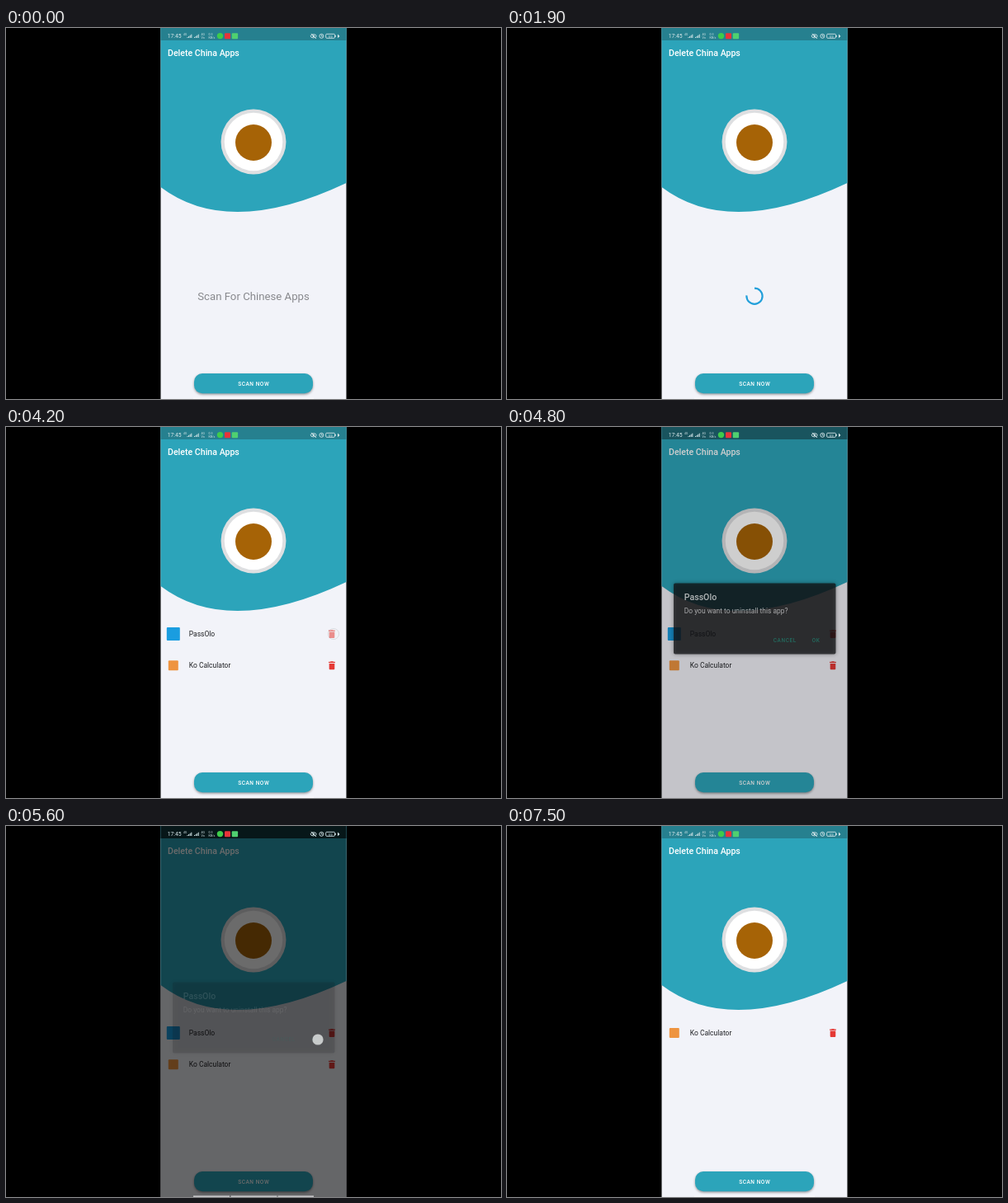
Animation, 600 px wide and 450 px high, one loop 8000 ms. Source, as an HTML page with a canvas:

```html
<!DOCTYPE html>
<html lang="en">
<head>
<meta charset="utf-8">
<title>App scan</title>
<style>
  html, body { margin: 0; width: 100%; height: 100%; overflow: hidden; background: #000; }
  canvas { display: block; width: 600px; height: 450px; }
</style>
</head>
<body>
<canvas id="stage" width="600" height="450"></canvas>
<script>
const ctx = document.getElementById('stage').getContext('2d');
const LOOP = 8000, STEP = 100;
const LEFT = 187.5, WIDTH = 225;
const TEAL = '#2ca4ba', PAGE = '#f2f3f9', RED = '#e53935';
const APPS = [
  { name: 'PassOlo', color: '#1a9de0', size: 16 },
  { name: 'Ko Calculator', color: '#ee9440', size: 12 }
];

const ramp = (t, a, b) => Math.min(1, Math.max(0, (t - a) / (b - a)));
const ease = u => u * u * (3 - 2 * u);

function rect(x, y, w, h, color) {
  ctx.fillStyle = color;
  ctx.fillRect(x, y, w, h);
}

function round(x, y, w, h, r, color) {
  ctx.fillStyle = color;
  ctx.beginPath();
  ctx.roundRect(x, y, w, h, r);
  ctx.fill();
}

function disc(x, y, r, color) {
  ctx.fillStyle = color;
  ctx.beginPath();
  ctx.arc(x, y, r, 0, 2 * Math.PI);
  ctx.fill();
}

function text(str, x, y, size, color, { weight = 400, align = 'left', spacing = 0 } = {}) {
  ctx.font = `${weight} ${size}px Roboto, sans-serif`;
  ctx.textAlign = align;
  ctx.letterSpacing = spacing + 'px';
  ctx.fillStyle = color;
  ctx.fillText(str, x, y);
}

function drawHeader() {
  ctx.fillStyle = TEAL;
  ctx.beginPath();
  ctx.moveTo(LEFT, 0);
  ctx.lineTo(LEFT, 193);
  ctx.quadraticCurveTo(270, 255.5, LEFT + WIDTH, 188);
  ctx.lineTo(LEFT + WIDTH, 0);
  ctx.fill();
  rect(LEFT, 0, WIDTH, 15, '#26808f');
  text('Delete China Apps', 196, 34, 10.6, '#fff', { weight: 500 });
  disc(300, 138, 39.5, '#dedfe1');
  disc(300, 138, 35.3, '#fff');
  disc(300, 139, 22, '#a66306');
}

function drawButton() {
  ctx.save();
  ctx.shadowColor = 'rgba(0,0,0,.4)';
  ctx.shadowBlur = 3;
  ctx.shadowOffsetY = 1.2;
  round(228, 419, 144, 24.3, 10, TEAL);
  ctx.restore();
  text('SCAN NOW', 300.2, 434.3, 6.6, '#fff', { weight: 500, align: 'center', spacing: 0.5 });
}

function drawSpinner(t) {
  const phase = (t - 1900) / 1333 + 0.5;
  const cycle = Math.floor(phase), u = phase - cycle;
  const base = -90 + 270 * cycle + (t - 1900) * 0.162;
  const from = base + 270 * ease(ramp(u, 0.5, 1));
  const to = base + 270 * ease(ramp(u, 0, 0.5)) + 6;
  ctx.strokeStyle = '#229fda';
  ctx.lineWidth = 2.2;
  ctx.beginPath();
  ctx.arc(300, 325.3, 9.6, from * Math.PI / 180, to * Math.PI / 180);
  ctx.stroke();
}

function drawTrash(x, y) {
  rect(x - 1.7, y - 5, 3.4, 1, RED);
  rect(x - 3.9, y - 4.5, 7.8, 1.3, RED);
  round(x - 3.3, y - 2.4, 6.6, 7.3, [0, 0, 1, 1], RED);
}

function drawRow(app, y) {
  const half = app.size / 2;
  round(202.8 - half, y - half, app.size, app.size, 1, app.color);
  text(app.name, 221.7, y + 3, 8.5, '#202124');
  drawTrash(395, y);
}

function drawTouch(x, y, alpha) {
  disc(x, y, 6.6, `rgba(240,243,243,${alpha})`);
  ctx.strokeStyle = 'rgba(140,140,145,.3)';
  ctx.lineWidth = 0.7;
  ctx.stroke();
}

function drawDialog(alpha) {
  ctx.save();
  ctx.globalAlpha = alpha;
  ctx.shadowColor = 'rgba(0,0,0,.5)';
  ctx.shadowBlur = 5;
  round(202, 189.5, 196.5, 86, 2, '#111215');
  ctx.shadowColor = 'transparent';
  text(APPS[0].name, 214.7, 210, 10.6, '#e8e8e8', { weight: 500 });
  text('Do you want to uninstall this app?', 214.7, 226.3, 8.45, '#d4d4d5');
  const action = { weight: 500, spacing: 0.55 };
  text('CANCEL', 322.8, 261.4, 6.5, '#20806f', action);
  text('OK', 369.7, 261.4, 6.5, '#20806f', action);
  ctx.restore();
}

function drawSignal(x) {
  for (let i = 0; i < 4; i++) rect(x + i * 1.6, 11 - i * 1.1, 1, 1 + i * 1.1, '#cfe3e6');
}

function drawStatus() {
  const ink = '#d5e6e9';
  text('17:45', 195.7, 12.2, 6.8, ink);
  text('4G', 215, 9, 3.4, ink);
  drawSignal(219.5);
  drawSignal(228);
  for (const [x, a, b] of [[236.5, '4G', 'Vo'], [245.5, '0.3', 'KB/s']]) {
    text(a, x, 8.9, 3.6, ink);
    text(b, x, 12.5, 3.6, ink);
  }
  disc(259.5, 9.6, 3.7, '#3ecb4b');
  round(265, 6.2, 7, 7, 1, '#e8343a');
  round(273.7, 6.2, 7.4, 7, 1, '#4fd070');

  ctx.strokeStyle = ink;
  ctx.lineWidth = 0.9;
  ctx.beginPath();
  ctx.ellipse(372.7, 9.8, 3.5, 2.1, 0, 0, 2 * Math.PI);
  ctx.moveTo(370, 6.8);
  ctx.lineTo(376, 13);
  ctx.stroke();
  disc(372.7, 9.8, 1.2, ink);
  ctx.beginPath();
  ctx.arc(382.4, 9.8, 2.5, 0, 2 * Math.PI);
  ctx.moveTo(382.4, 8.3);
  ctx.lineTo(382.4, 10);
  ctx.lineTo(383.8, 10);
  ctx.roundRect(387.7, 7.3, 10.8, 5, 1);
  ctx.stroke();
  text('59', 393.2, 11.5, 4.2, ink, { align: 'center' });
  rect(399, 8.8, 0.8, 2, ink);
  ctx.fillStyle = ink;
  ctx.beginPath();
  ctx.moveTo(402, 7.6);
  ctx.lineTo(404.5, 9.9);
  ctx.lineTo(402, 12.2);
  ctx.fill();
}

function drawNavigation(dimmed) {
  if (!dimmed) return rect(227, 448.6, 146, 1.4, '#fbfbfd');
  for (const [x, w] of [[227, 44], [272.5, 56], [329.5, 43.5]]) rect(x, 448.4, w, 1.6, '#c6c6c8');
}

function draw(t) {
  rect(0, 0, 600, 450, '#000');
  rect(LEFT, 0, WIDTH, 450, PAGE);
  drawHeader();
  drawButton();

  if (t < 700) text('Scan For Chinese Apps', 300, 329.8, 13.2, '#88898d', { align: 'center' });
  else if (t < 3100) drawSpinner(t);
  else APPS.slice(t < 6000 ? 0 : 1).forEach((app, i) => drawRow(app, 251 + i * 38.3));

  if (t >= 4100 && t < 4400) drawTouch(397, 251, 0.45);

  const dim = t < 5700 ? 0.58 * ramp(t, 4700, 5000) : 0;
  if (dim) rect(LEFT, 0, WIDTH, 450, `rgba(0,0,0,${dim})`);
  if (dim) rect(LEFT, 0, WIDTH, 15, `rgba(0,0,0,${dim})`);
  drawStatus();
  drawNavigation(dim > 0);

  const shown = ramp(t, 4650, 4850) * (1 - ramp(t, 5480, 5620));
  if (shown) drawDialog(shown);
  if (t >= 5500 && t < 5700) drawTouch(378, 259, 0.75);
}

const start = performance.now();
function tick() {
  const t = (performance.now() - start) % LOOP;
  draw(Math.floor(t / STEP) * STEP);
  requestAnimationFrame(tick);
}
tick();
</script>
</body>
</html>
```
